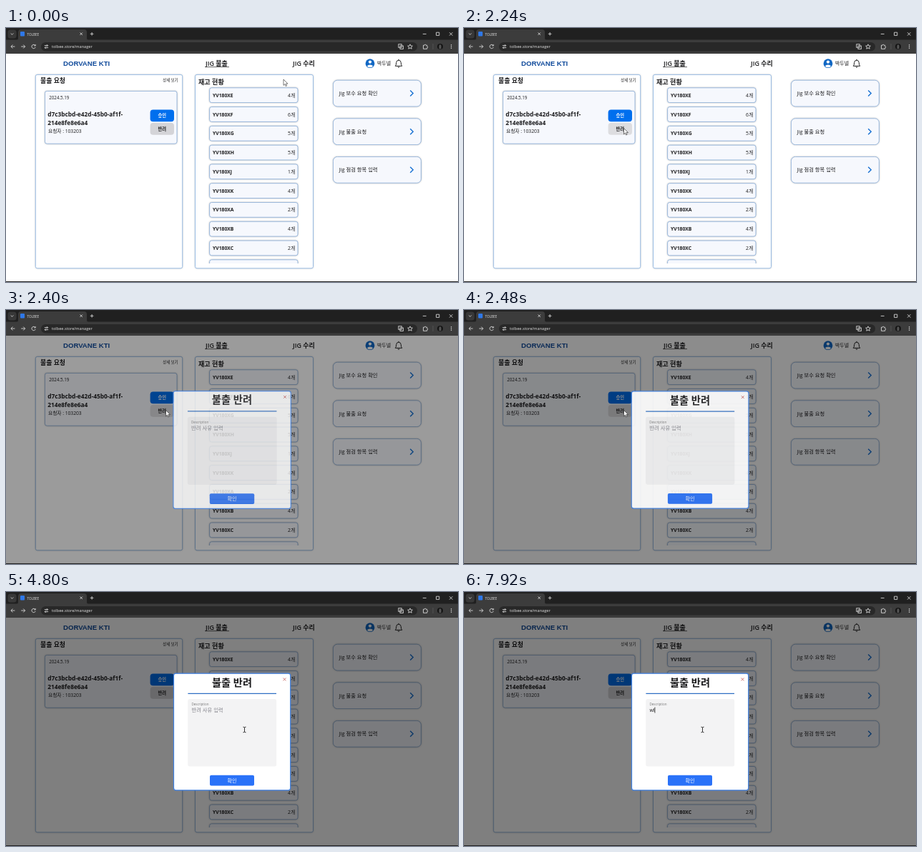
An HTML page that plays this animation: 632 by 356 pixels, repeating every 8000 ms.

```html
<!DOCTYPE html>
<html lang="ko">
<head>
<meta charset="utf-8">
<title>TOLBEE</title>
<style>
  html, body { margin: 0; width: 100%; height: 100%; overflow: hidden; background: #fff; }
  svg { display: block; font-family: "Open Sans", "Noto Sans CJK KR", "Noto Sans CJK", sans-serif; }
  text { fill: #1c1c1e; }
  .b { font-weight: 700; }
  .mid { text-anchor: middle; }
  .end { text-anchor: end; }
  .white { fill: #fff; }
  .icon { fill: none; stroke: #d6d6d6; stroke-width: .9; }
  .panel { fill: #fff; stroke: #8fb6e2; stroke-width: .9; filter: drop-shadow(.6px .8px .8px #0003); }
  .card { fill: #f6f8fd; stroke: #86abd9; stroke-width: .8; filter: drop-shadow(.5px .8px .8px #0004); }
</style>
</head>
<body>
<svg width="632" height="356" viewBox="0 0 632 356">
  <defs>
    <clipPath id="listClip"><rect x="270" y="80" width="150" height="250"/></clipPath>
  </defs>

  <!-- browser window -->
  <rect width="632" height="36" fill="#202020"/>
  <path d="M14 17q3 0 3-3V6q0-4 4-4h88q4 0 4 4v8q0 3 3 3z" fill="#3c3c3c"/>
  <rect y="16.5" width="632" height="19.5" fill="#3c3c3c"/>
  <rect x="49" y="20" width="526" height="12.5" rx="6.2" fill="#282828"/>
  <rect x="2.5" y="2.5" width="12" height="12" rx="3.5" fill="#383838"/>
  <rect x="20" y="5" width="6" height="6.5" rx="1" fill="#2f78e8"/>
  <text x="29.5" y="10.6" font-size="4.6" style="fill:#e4e4e4">TOLBEE</text>
  <text x="64" y="28.2" font-size="5.6" style="fill:#e4e4e4">tolbee.store/manager</text>
  <g class="icon">
    <path d="M6.7 7.5l1.8 1.8 1.8-1.8M103.5 6.5l3.4 3.4m0-3.4l-3.4 3.4M117.8 8.3h4.6M120.1 6v4.6"/>
    <path d="M12.4 26H7m2.4-2.5L6.9 26l2.5 2.5M21.2 26h5.4m-2.4-2.5l2.5 2.5-2.5 2.5"/>
    <path d="M41 24.6a2.7 2.7 0 1 0 .2 2.3M41.2 22.9v2h-2"/>
    <path d="M53.8 24.6h2.8m1 0h1.5M53.8 27.6h1.4m1.2 0h2.7"/>
    <circle cx="57.4" cy="24.6" r=".9"/><circle cx="55.4" cy="27.6" r=".9"/>
    <rect x="548.8" y="22.7" width="4.4" height="4.6"/><rect x="551" y="25" width="4.4" height="4.4"/>
    <path d="M565 22.8l1 2.2 2.4.2-1.8 1.6.6 2.4-2.2-1.3-2.2 1.3.6-2.4-1.8-1.6 2.4-.2z"/>
    <path d="M583.5 24.2h1.7a1 1 0 0 1 2 0h1.5v1.6a1 1 0 0 1 0 2v1.5h-5.2z"/>
    <path d="M597 22v8" stroke="#555"/>
    <path d="M582.8 8.4h4.8M601.6 6.2h4.2v4.2h-4.2zM620 6.2l4.4 4.4m0-4.4l-4.4 4.4"/>
  </g>
  <circle cx="607" cy="26" r="4" fill="#151515"/>
  <path d="M605.5 29.2v-4q0-2 1.5-2t1.5 2v4z" fill="#555"/>
  <g fill="#ddd"><circle cx="622.6" cy="23.7" r=".7"/><circle cx="622.6" cy="26" r=".7"/><circle cx="622.6" cy="28.3" r=".7"/></g>

  <!-- page -->
  <rect y="36" width="632" height="319" fill="#fff"/>
  <text class="b" x="80" y="53.4" font-size="9.6" style="fill:#124c9c;font-family:'Liberation Sans',sans-serif">DORVANE KTI</text>
  <g font-size="9" font-weight="600">
    <text x="279" y="53">JIG 불출</text>
    <text x="401" y="53">JIG 수리</text>
  </g>
  <path d="M279 54.6h33" stroke="#222" stroke-width=".7"/>
  <circle cx="509" cy="49.7" r="6.4" fill="#1268c4"/>
  <circle cx="509" cy="47.6" r="2.1" fill="#fff"/>
  <path d="M504.9 53.4a4.4 3 0 0 1 8.2 0 5.4 5.4 0 0 1-8.2 0z" fill="#fff"/>
  <text x="519" y="52.2" font-size="6.9">박두넬</text>
  <path d="M544.3 53.3q1.4-1.2 1.4-4.6 0-3.3 3.3-3.6 3.3.3 3.3 3.6 0 3.4 1.4 4.6zM547.7 54.4q1.3 2 2.6 0M549 45v-1.2" fill="none" stroke="#222" stroke-width="1"/>

  <rect class="panel" x="41.3" y="65.4" width="205.4" height="271.4" rx="2.5"/>
  <text class="b" x="48" y="76.6" font-size="8.9">불출 요청</text>
  <text class="end" x="240.6" y="75.4" font-size="5.4">상세 보기</text>
  <rect class="card" x="54.4" y="88.4" width="184.6" height="73.8" rx="3"/>
  <text x="60.3" y="100" font-size="6.2">2024.5.19</text>
  <g class="b" font-size="8.3">
    <text x="58.2" y="123.8">d7c3bcbd-e42d-45b0-af1f-</text>
    <text x="58.2" y="135.8">214e8fe8e6a4</text>
  </g>
  <text x="59" y="147" font-size="6.7">요청자 : 103203</text>
  <rect x="201.6" y="114.4" width="33.4" height="16.8" rx="4" fill="#006fee"/>
  <text class="b mid white" x="218.2" y="125" font-size="6.3">승인</text>
  <rect id="reject" x="201.6" y="133" width="33.4" height="16.8" rx="4"/>
  <text class="b mid" x="218.2" y="143.6" font-size="6.3">반려</text>

  <rect class="panel" x="264.5" y="65.4" width="165" height="271.4" rx="2.5"/>
  <text class="b" x="269" y="78.8" font-size="9.1">재고 현황</text>
  <g id="stock" clip-path="url(#listClip)" font-size="6.8"></g>
  <g id="links" font-size="7.3"></g>
  <rect y="355" width="632" height="1" fill="#222"/>

  <!-- dialog -->
  <rect id="overlay" y="36" width="632" height="319"/>
  <g id="dialog">
    <rect x="234.5" y="114.2" width="163.2" height="163.6" rx="3" fill="#fff" stroke="#3f80e2" stroke-width="1.2"/>
    <text class="b mid" x="316" y="131.8" font-size="14.2">불출 반려</text>
    <path d="M387.6 120.5l3.8 3.8m0-3.8l-3.8 3.8" stroke="#c0504d" stroke-width=".8"/>
    <path d="M254.4 142.3h123.6" stroke="#2f6fc4" stroke-width="1.2"/>
    <rect x="254.2" y="150" width="124" height="94.6" rx="3" fill="#f3f3f4"/>
    <text x="259.5" y="159.4" font-size="4.5" style="fill:#777">Description</text>
    <text id="hint" x="259.5" y="167.9" font-size="7.3" style="fill:#85858c">반려 사유 입력</text>
    <text id="typed" x="259.5" y="168" font-size="6.8"></text>
    <rect id="caret" y="161.5" width=".8" height="8" fill="#222"/>
    <rect x="285" y="256.8" width="62" height="14.6" rx="2" fill="#2a72f8"/>
    <text class="mid white" x="316" y="266.6" font-size="7">확인</text>
  </g>

  <path id="arrow" d="M0 0V8.4L1.9 6.6 3.2 9.5 4.6 8.9 3.3 6.1H6Z" fill="#fff" stroke="#222" stroke-width=".6"/>
  <path id="beam" d="M-2-3.8q2 0 2 1 0-1 2-1M0-3v6M-2 3.8q2 0 2-1 0 1 2 1" fill="none" stroke="#222" stroke-width=".9"/>
</svg>
<script>
const $ = id => document.getElementById(id);
const LOOP = 8000, STEP = 80;
const OPEN = 2245, FOCUS = 3900, BLINK = 500;
const KEYS = [[7560, "w"], [7800, "wl"]];
// cursor waypoints: time, x, y
const PATH = [[0, 388, 72], [1040, 388, 72], [2000, 223.5, 140.5], [2560, 223.5, 140.5], [3280, 333.5, 193]];

const stock = { E: 4, F: 6, G: 5, H: 5, J: 1, K: 4, A: 2, B: 4, C: 2, D: 3 };
$("stock").innerHTML = Object.entries(stock).map(([letter, count], i) => {
  const y = 83.8 + 26.78 * i;
  return `<rect class="card" x="284.6" y="${y}" width="123.4" height="20.8" rx="3"/>
    <text class="b" x="289" y="${y + 13}">YV180X${letter}</text>
    <text class="end" x="404.2" y="${y + 13}">${count}개</text>`;
}).join("");

$("links").innerHTML = ["보수 요청 확인", "불출 요청", "점검 항목 입력"].map((label, i) => {
  const y = 73.2 + 53.6 * i;
  return `<rect class="card" x="457.4" y="${y}" width="123" height="36.8" rx="6"/>
    <text x="465.8" y="${y + 21}">Jig ${label}</text>
    <path d="M565.2 ${y + 14.4}l4 4-4 4" fill="none" stroke="#1670d2" stroke-width="1.4"/>`;
}).join("");

function cursorAt(t) {
  const next = PATH.findIndex(p => p[0] > t);
  if (next < 0) return PATH.at(-1).slice(1);
  const [t0, x0, y0] = PATH[next - 1], [t1, x1, y1] = PATH[next];
  const u = (t - t0) / (t1 - t0), e = u * u * (3 - 2 * u);
  return [x0 + (x1 - x0) * e, y0 + (y1 - y0) * e];
}

const show = (id, on) => $(id).setAttribute("visibility", on ? "visible" : "hidden");

function draw(t) {
  const shown = t < OPEN ? 0 : 1 - Math.exp((OPEN - t) / 100);
  $("overlay").setAttribute("opacity", shown * 0.5);
  $("dialog").setAttribute("opacity", shown);
  $("dialog").setAttribute("transform",
    `translate(316 196) scale(${1 + 0.035 * (1 - shown)}) translate(-316 -196)`);

  const [x, y] = cursorAt(t);
  const overButton = x > 201 && x < 235 && y > 133 && y < 150;
  const overField = t > OPEN && x > 254 && x < 378 && y > 150 && y < 245;
  $("reject").setAttribute("fill", overButton ? "#dddde0" : "#d4d4d8");
  for (const id of ["arrow", "beam"]) $(id).setAttribute("transform", `translate(${x} ${y})`);
  show("arrow", !overField);
  show("beam", overField);

  const [since, value] = KEYS.findLast(k => k[0] <= t) || [FOCUS, ""];
  $("typed").textContent = value;
  show("hint", !value);
  $("caret").setAttribute("x", 259.5 + (value ? $("typed").getComputedTextLength() : 0));
  show("caret", t >= FOCUS && Math.floor((t - since) / BLINK) % 2 === 0);
}

function tick() {
  const t = performance.now() % LOOP;
  draw(Math.floor(t / STEP) * STEP);
  requestAnimationFrame(tick);
}
tick();
</script>
</body>
</html>
```
